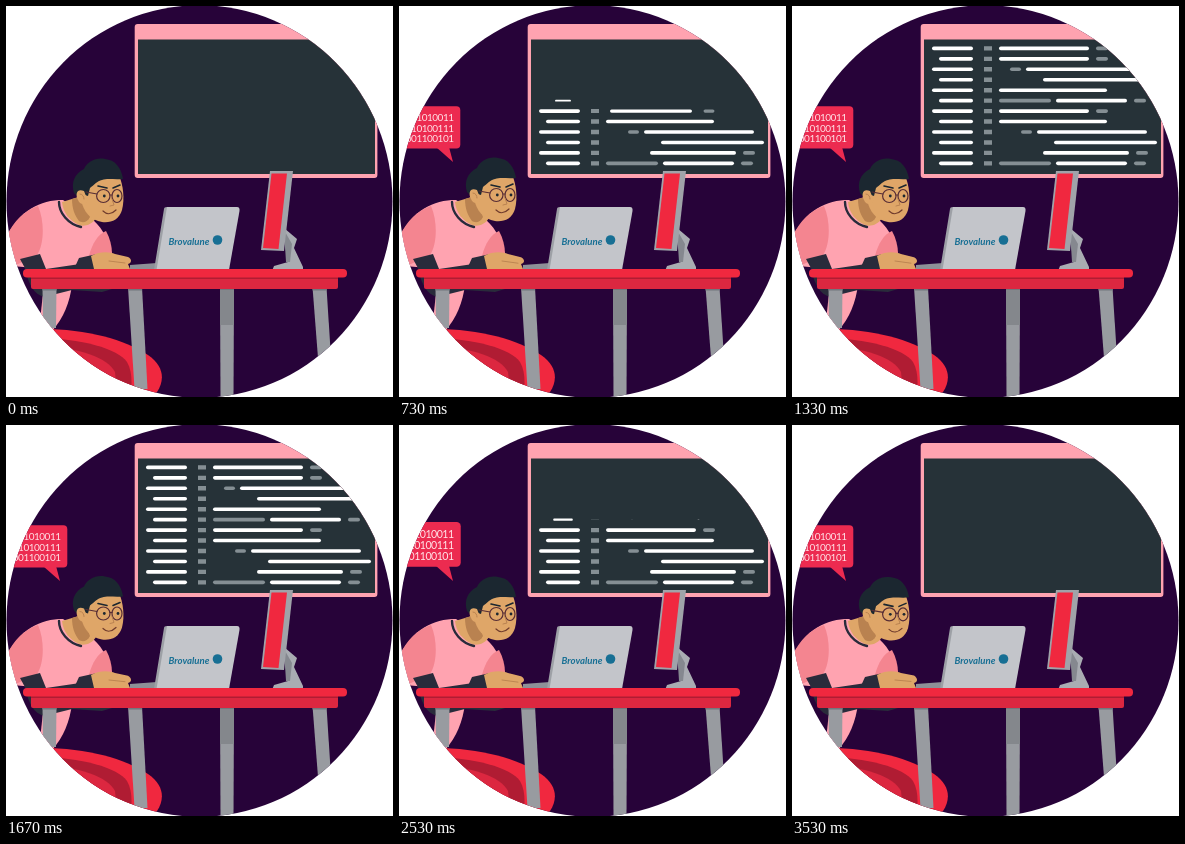
An HTML page with a canvas that plays this animation: 387x391 px, repeating every 3590 ms.

```html
<!DOCTYPE html>
<html lang="en">
<head>
<meta charset="utf-8">
<title>Coder at a desk</title>
<style>
html, body { margin: 0; width: 100%; height: 100%; overflow: hidden; background: #fff; }
canvas { display: block; width: 387px; height: 391px; }
</style>
</head>
<body>
<canvas id="stage" width="387" height="391"></canvas>
<script>
const ctx = document.getElementById('stage').getContext('2d');
const LOOP = 3590;
const HALF = LOOP / 2;
const C = {
  night: '#270339', red: '#f0283f', deep: '#dc2740', maroon: '#b01c33', bubble: '#ec2b50',
  pink: '#ffa3b0', rose: '#f48590', slate: '#263238', grey: '#989ba0', dim: '#858f94',
  dark: '#292b3b', hair: '#1b2730', skin: '#dfa668', shade: '#b98250', blue: '#176f94'
};
const ROWS = 12;
const indents = '001400002540';
const bits = ['011010011', '110100111', '001100101'];

const clamp = v => Math.max(0, Math.min(1, v));
const bump = (t, mid, reach) =>
  Math.abs(t - mid) < reach ? (1 + Math.cos(Math.PI * (t - mid) / reach)) / 2 : 0;
const backOut = v => 1 + 2.2 * (v - 1) ** 3 + 1.2 * (v - 1) ** 2;

function box(color, x, y, w, h, r = 0) {
  ctx.fillStyle = color;
  ctx.beginPath();
  ctx.roundRect(x, y, w, h, r);
  ctx.fill();
}
function shape(color, d) {
  ctx.fillStyle = color;
  ctx.fill(new Path2D(d));
}
function line(color, width, d) {
  ctx.strokeStyle = color;
  ctx.lineWidth = width;
  ctx.lineCap = 'round';
  ctx.stroke(new Path2D(d));
}
function ring(color, width, x, y, rx, ry) {
  ctx.strokeStyle = color;
  ctx.lineWidth = width;
  ctx.beginPath();
  ctx.ellipse(x, y, rx, ry, 0, 0, 7);
  ctx.stroke();
}
function disc(color, x, y, r) {
  ctx.fillStyle = color;
  ctx.beginPath();
  ctx.arc(x, y, r, 0, 7);
  ctx.fill();
}

// A code line that grows out of its own centre.
function bar(from, to, y, color, grow) {
  const w = (to - from) * grow, h = 3.6 * grow;
  box(color, (from + to - w) / 2, y - h / 2, w, h, h / 2);
}

function codeRow(i, p) {
  const y = 42.4 + i * 10.45;
  const start = 440 + (ROWS - 1 - i) * 45;
  const left = clamp((p - start) / 45), right = clamp((p - start - 25) / 45);
  bar(140 + i % 2 * 7, 181, y, '#fff', left);
  box(C.dim, 192, y - 2.2 * right, 8, 4.4 * right);

  const lead = i % 3 === 2, tail = i % 5 < 2;
  let x = 207 + indents[i] * 11;
  const end = 305 + indents[i] * 10 + (lead ? 30 : tail ? -8 : 10);
  if (lead) {
    const w = i % 2 ? 52 : 11;
    bar(x, x + w, y, C.dim, right);
    x += w + 5;
  }
  bar(x, end, y, '#fff', right);
  if (tail) bar(end + 7, end + 19, y, C.dim, right);
}

function wallScreen(p) {
  box(C.pink, 128.7, 18, 242.7, 154, 3);
  box(C.slate, 132, 33.5, 237, 134.5);
  if (p < 1700) for (let i = 0; i < ROWS; i++) codeRow(i, p);
}

function bubble(t) {
  const pop = clamp((t - 90) / 240);
  if (!pop) return;
  const s = backOut(pop) * (1 + 0.06 * bump(t, 2530, 230));
  ctx.save();
  ctx.translate(54, 156);
  ctx.scale(s, s);
  ctx.translate(-54, -156);
  box(C.bubble, -8, 100.3, 69.3, 42.3, 4);
  shape(C.bubble, 'M37 141 L50 141 L54 156Z');
  ctx.fillStyle = '#ffe4e8';
  ctx.font = '10px Lato, sans-serif';
  ctx.letterSpacing = '-0.5px';
  ctx.textAlign = 'right';
  bits.forEach((s, i) => ctx.fillText(s, 54.5, 115 + i * 10.5));
  ctx.restore();
}

function chair() {
  shape(C.red, 'M30 323 C78 322 118 333 142 349 C158 360 159 374 151 386 L138 395 L30 395Z');
  shape(C.maroon, 'M30 332 C76 332 112 343 121 356 C127 366 126 380 124 395 L30 395Z');
  shape(C.deep, 'M30 340 C74 341 102 352 109 366 L112 395 L30 395Z');
}

function torso() {
  shape(C.pink, 'M38 278 L66 278 C64 297 57 312 47 324 L34 315Z');
  shape(C.dark, 'M14 244 L43 246 L92 248 L98 263 L106 283 L96 286 L66 284 L38 291 C28 288 23 279 20 266Z');
  shape(C.pink, 'M-2 236 C12 205 33 194 57 194 L84 212 C94 218 102 232 106 248 L86 250 L74 258 L40 263 L6 260Z');
  shape(C.rose, 'M-2 235 C7 216 17 205 32 200 C39 216 38 239 31 249 L12 258 L4 260Z');
  shape(C.rose, 'M83 250 C86 238 92 228 100 225 C104 232 106 240 106 248Z');
  shape(C.dark, 'M14 253 L34 248 L40 263 L20 264Z');
  shape(C.dark, 'M73 252 L91 248 L94 263 L68 263Z');
  shape(C.skin, 'M56 196 L76 190 L90 212 C86 219 78 221 73 219 C64 215 57 207 56 196Z');
  shape(C.shade, 'M66 193 L76 190 L84 211 C81 217 76 217 73 215 C69 210 66 203 66 193Z');
  line(C.dark, 2.4, 'M53 196 C53 207 62 218 75 221');
}

function head(dy) {
  ctx.save();
  ctx.translate(0, dy);
  shape(C.skin, 'M75 175 L113 169 C117 179 119 192 116 204 C113 214 105 217 96 216 C85 214 77 206 75 193Z');
  shape(C.hair, 'M68 187 C65 177 68 168 78 163 C81 156 90 151 99 153 C109 154 115 161 117 173 C108 174 102 172 96 174 C91 175 88 179 84 182 L82 190 L76 188 L74 193Z');
  shape(C.skin, 'M78 185 C71 182 69 188 72 194 C74 199 79 199 82 195Z');
  line(C.shade, 1, 'M74 188 C77 188 78 191 78 193');
  line(C.hair, 1.6, 'M92 180 L101 182 M107 182 L114 179');
  line('#572d35', 1.2, 'M104 189 L106 189 M91 188 L80 186');
  for (const [x, r] of [[97.3, 6.7], [111, 5]]) {
    ring('#572d35', 1.2, x, 190, r, 6.5);
    disc(C.hair, x + 1, 190, 1.4);
  }
  line(C.shade, 1, 'M106 193 L108 199 L104 200');
  line('#713d2d', 1.2, 'M97 205 C101 209 106 208 110 204');
  ctx.restore();
}

function hands(p) {
  const tap = 0.6 * Math.sin(p / HALF * Math.PI * 12);
  shape(C.skin, `M85 250 C94 245 104 246 109 248 L122 ${251 + tap} C126 253 126 257 122 258 L124 263 L88 263Z`);
  line(C.shade, 0.9, `M103 255 L119 ${257 + tap}`);
}

function leg(x, lean, bottom) {
  shape(C.grey, `M${x} 281 h14 L${x + 13.5 + lean} ${bottom} h-13Z`);
  box('#73777e', x, 282, 14, 2.5);
}

function desk() {
  leg(36.5, 0, 322);
  leg(122, 6, 383);
  leg(214, 0, 391);
  box('#84878c', 214, 284, 14, 35);
  leg(306.5, 5, 352);
  box(C.deep, 25, 270, 307, 13, 2);
  box(C.maroon, 25, 270, 307, 3);
  box(C.red, 17, 263, 324, 8.5, 4);
}

function laptop() {
  shape('#8d9097', 'M124 259 L151 257 V264 H124Z');
  shape('#9da0a6', 'M158 203 Q158 201 161 201 H231 L222 264 H148Z');
  shape('#c3c5ca', 'M161 201 H231 Q234 201 233.5 205 L223 264 H150.5Z');
  ctx.fillStyle = C.blue;
  ctx.font = 'italic bold 9.6px Lato, sans-serif';
  ctx.textAlign = 'left';
  ctx.fillText('Brovalune', 162.5, 238.5);
  disc(C.blue, 211.5, 234, 4.8);
}

function monitor() {
  shape('#a9acb2', 'M278 222 L291 233 L288 242 L297 261 V265 H266 L268 260 L282 256 L279 240Z');
  shape('#85888f', 'M278 224 L286 238 L284 256 L280 256Z');
  shape('#a0a3a9', 'M264 165 H287 L278 245 L255 244Z');
  shape(C.red, 'M265.5 167.5 H281 L272.5 243 L257 242Z');
}

function draw(t) {
  const p = t % HALF;
  ctx.fillStyle = '#fff';
  ctx.fillRect(0, 0, 387, 391);
  ctx.save();
  ctx.beginPath();
  ctx.ellipse(193.5, 195.5, 193, 196.3, 0, 0, 7);
  ctx.clip();
  ctx.fillStyle = C.night;
  ctx.fillRect(0, 0, 387, 391);
  wallScreen(p);
  bubble(t);
  chair();
  torso();
  head(-1.5 * bump(p, 1670, 120) - bump(p, 735, 200));
  monitor();
  laptop();
  hands(p);
  desk();
  ctx.restore();
}

const begin = performance.now();
function tick() {
  draw((performance.now() - begin) % LOOP);
  requestAnimationFrame(tick);
}
tick();
</script>
</body>
</html>
```
